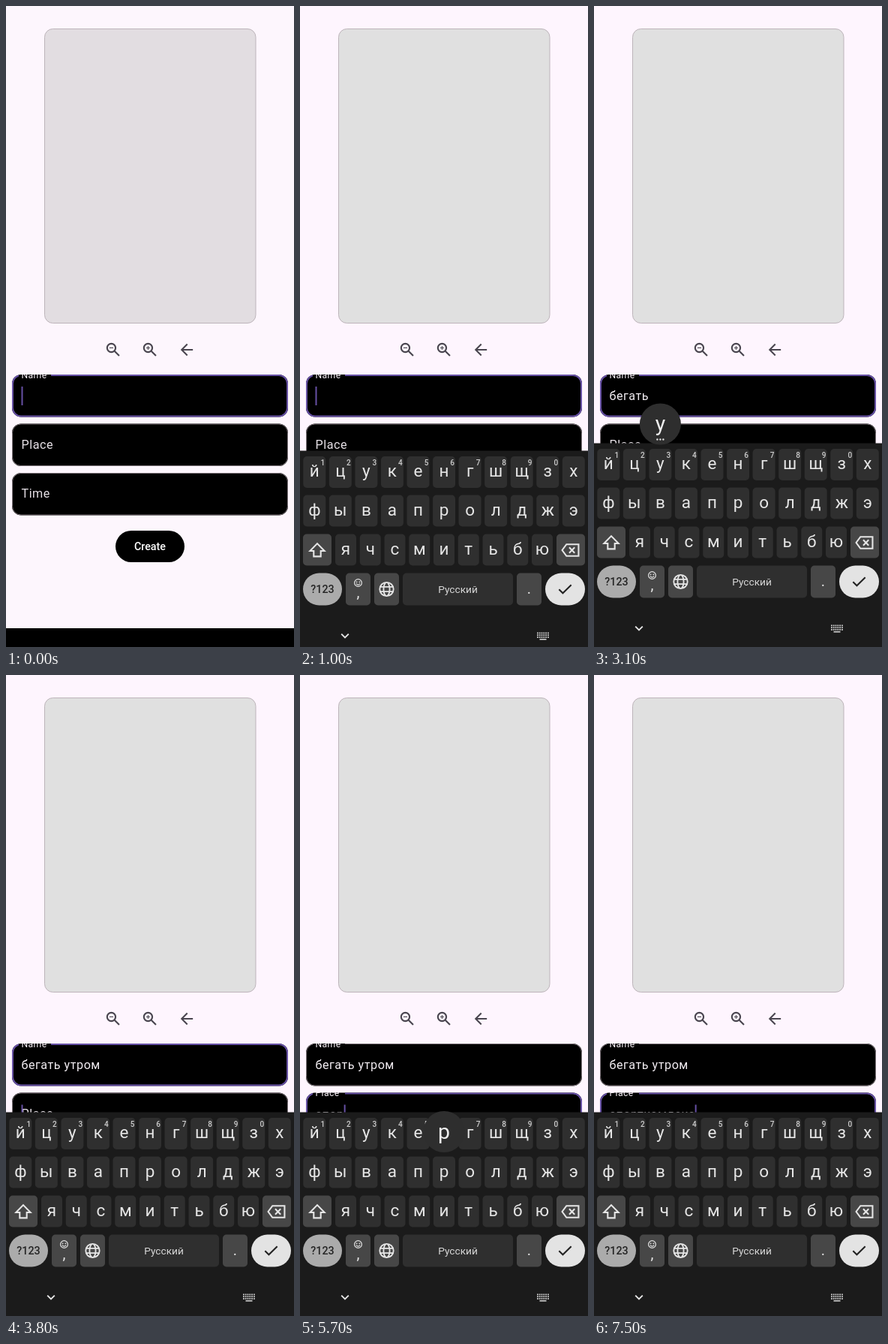
An HTML page with a canvas for the animation above (8 s loop, 384 by 854 pixels).

```html
<!DOCTYPE html>
<html lang="en">
<head>
<meta charset="utf-8">
<title>Card form</title>
<style>
html, body { margin: 0; width: 100%; height: 100%; overflow: hidden; background: #fef6fe; }
canvas { display: block; width: 384px; height: 854px; }
</style>
</head>
<body>
<canvas id="stage" width="384" height="854"></canvas>
<script>
const ctx = document.getElementById('stage').getContext('2d');
const LOOP = 8000, STEP = 100;
const PURPLE = '#6650a4', KEY = '#2f2f2f', SPECIAL = '#474747', BOARD = '#1b1b1b', GLYPH = '#e6e6e6';
const NAME = 'бегать утром', PLACE = 'спорткомлекс';

// [time, letters in Name, letters in Place, pressed key, key darkened]
const STATES = [
  [0, 0, 0],
  [1600, 0, 0, 'б'], [1700, 1, 0, 'е', 1], [1800, 2, 0, 'е'], [1900, 2, 0, 'г', 1],
  [2000, 3, 0, 'г'], [2100, 3, 0, 'а', 1], [2200, 4, 0, 'т', 1], [2300, 5, 0, 'ь', 1],
  [2400, 6, 0], [2500, 6, 0, 'space', 1], [2600, 7, 0],
  [3100, 7, 0, 'у'], [3200, 8, 0, 'т', 1], [3300, 9, 0, 'р', 1], [3400, 10, 0, 'р'],
  [3500, 10, 0, 'о', 1], [3600, 11, 0, 'м', 1], [3700, 12, 0, 'done', 1], [3800, 12, 0],
  [5200, 12, 0, 'с'], [5300, 12, 1, 'п', 1], [5400, 12, 2, 'п'], [5500, 12, 2, 'о', 1],
  [5600, 12, 3, 'р', 1], [5700, 12, 4, 'р'], [5800, 12, 4, 'т', 1], [5900, 12, 5],
  [6200, 12, 5, 'к'], [6300, 12, 6, 'к'], [6400, 12, 6, 'о', 1], [6500, 12, 7],
  [6800, 12, 7, 'м'], [6900, 12, 8, 'л', 1], [7000, 12, 9, 'л'], [7100, 12, 9, 'е', 1],
  [7200, 12, 10, 'к', 1], [7300, 12, 11, 'к'], [7400, 12, 11, 'с', 1], [7500, 12, 12]
];
const HIDDEN_CURSOR = [[100, 600], [1100, 1600], [3100, 3200], [4300, 4800]];

const ROWS = [
  { letters: 'йцукенгшщзх', x: 19.3, gap: 34.55, y: 611, w: 30 },
  { letters: 'фывапролджэ', x: 19.3, gap: 34.55, y: 662.5, w: 30 },
  { letters: 'ячсмитьбю', x: 61, gap: 32.75, y: 714.5, w: 28 }
];
const keys = ROWS.flatMap((row, r) => [...row.letters].map((char, i) => ({
  char, x: row.x + i * row.gap, y: row.y, w: row.w, row: r,
  digit: r === 0 && i < 10 ? String((i + 1) % 10) : ''
})));

function box(x, y, w, h, r, fill) {
  ctx.beginPath();
  ctx.roundRect(x, y, w, h, r);
  if (fill) { ctx.fillStyle = fill; ctx.fill(); }
}

function text(str, x, y, size, color, { align = 'left', weight = 400, spacing = 0 } = {}) {
  ctx.font = `${weight} ${size}px Roboto, sans-serif`;
  ctx.letterSpacing = spacing + 'px';
  ctx.textAlign = align;
  ctx.fillStyle = color;
  ctx.fillText(str, x, y);
  return ctx.measureText(str).width;
}

// Strokes a path given in 24-unit icon space, centred on (x, y).
function icon(path, x, y, size, color, width = 2) {
  ctx.save();
  ctx.translate(x - size / 2, y - size / 2);
  ctx.scale(size / 24, size / 24);
  ctx.strokeStyle = color;
  ctx.lineWidth = width;
  ctx.stroke(new Path2D(path));
  ctx.restore();
}

function dot(x, y, r, color) {
  ctx.fillStyle = color;
  ctx.beginPath();
  ctx.arc(x, y, r, 0, Math.PI * 2);
  ctx.fill();
}

function lens(x, plus) {
  const color = '#49454f';
  icon('M15 9.5a5.5 5.5 0 1 1-11 0a5.5 5.5 0 1 1 11 0M13.9 13.9l5.9 5.9', x, 458, 24.5, color, 2.1);
  icon('M7 9.5h5' + (plus ? 'M9.5 7v5' : ''), x, 458, 24.5, color, 1.1);
}

// float: 0 = label rests inside the field, 1 = label sits on the border
function field(y, label, { value = '', focused = false, float = 0, cursor = false } = {}) {
  box(8, y, 368, 56.5, 12, '#000');
  const inset = focused ? 1 : 0.5;
  ctx.save();
  if (float > 0) {
    ctx.beginPath();
    ctx.rect(0, y - 3, 17, 9);
    ctx.rect(17 + 43 * float, y - 3, 384, 9);
    ctx.rect(0, y + 6, 384, 60);
    ctx.clip();
  }
  box(8 + inset, y + inset, 368 - 2 * inset, 56.5 - 2 * inset, 12 - inset);
  ctx.strokeStyle = focused ? PURPLE : '#7c7379';
  ctx.lineWidth = focused ? 2 : 1;
  ctx.stroke();
  ctx.restore();
  text(label, 20.5, y + 33 - 28.5 * float, 16.2 - 4 * float,
    float ? '#fdf5fc' : '#e6e0e6', { spacing: 0.5 - 0.12 * float });
  const width = text(value, 20.5, y + 34, 16.2, '#f2edf2', { spacing: 0.5 });
  if (cursor) {
    ctx.fillStyle = PURPLE;
    ctx.fillRect(20.5 + width, y + 16, 2, 25);
  }
}

function form(t, state) {
  const [, nameCount, placeCount] = state;
  const early = t < 800;
  ctx.fillStyle = early ? '#fdf6fd' : '#fef5fe';
  ctx.fillRect(0, 0, 384, 854);

  box(51.5, 30.5, 281.5, 392, 11, early ? '#e2dde1' : '#e0e0e0');
  ctx.strokeStyle = '#bdb4ba';
  ctx.lineWidth = 1;
  ctx.stroke();

  lens(143, false);
  lens(192, true);
  icon('M20 12H5M12.7 4.7L5.4 12l7.3 7.3', 241, 458, 24.5, '#49454f');

  const visible = !HIDDEN_CURSOR.some(([from, to]) => t >= from && t < to);
  const inPlace = t >= 3800;
  const placeFocused = t >= 4300;
  field(491, 'Name', {
    value: NAME.slice(0, nameCount), focused: !placeFocused, float: 1, cursor: visible && !inPlace
  });
  field(556.5, 'Place', {
    value: PLACE.slice(0, placeCount), focused: placeFocused,
    float: t >= 4400 ? 1 : placeFocused ? 0.5 : 0, cursor: visible && inPlace
  });
  field(622, 'Time');

  box(146, 699, 92, 42, 21, '#000');
  text('Create', 192, 725, 14.3, '#fff', { align: 'center', weight: 500 });
  ctx.fillStyle = '#000';
  ctx.fillRect(0, 829, 384, 25);
}

function letterKey(key, pressed) {
  box(key.x - key.w / 2, key.y - 21, key.w, 42, 5, pressed ? '#1e1e1e' : KEY);
  text(key.char, key.x, key.y + 6, 22.5, pressed ? '#585858' : GLYPH, { align: 'center' });
  text(key.digit, key.x + 11, key.y - 9, 10, pressed ? '#585858' : '#cfcfcf', { align: 'center', weight: 500 });
}

function popup(key) {
  const y = key.y - 54;
  dot(key.x, y, 27.5, '#2e2e2e');
  text(key.char, key.x, y + 9, 28.5, '#efefef', { align: 'center' });
  if (key.row === 0) for (const dx of [-4, 0, 4]) dot(key.x + dx, y + 20.5, 1.2, '#dcdcdc');
}

function bottomRow(active) {
  const y = 745.5, h = 43;
  box(4, y, 52, h, 21.5, '#ababab');
  text('?123', 30, 772, 14.3, '#242424', { align: 'center', weight: 500 });

  box(61, y, 33, h, 5, SPECIAL);
  icon('M21 12a9 9 0 1 1-18 0a9 9 0 1 1 18 0M7.5 14a5 5 0 0 0 9 0', 77.5, 758.5, 13, GLYPH, 2.2);
  dot(75.6, 757.3, 0.9, GLYPH);
  dot(79.4, 757.3, 0.9, GLYPH);
  text(',', 77.5, 778, 20, GLYPH, { align: 'center' });

  box(99, y, 33, h, 5, SPECIAL);
  icon('M21 12a9 9 0 1 1-18 0a9 9 0 1 1 18 0M16 12a4 9 0 1 1-8 0a4 9 0 1 1 8 0M4 9h16M4 15h16',
    115.5, 767, 24.5, GLYPH, 1.8);

  box(137, y, 147, h, 5, active === 'space' ? SPECIAL : KEY);
  text('Русский', 210.5, 771.5, 13.7, '#d8d8d8', { align: 'center' });

  box(289, y, 33, h, 5, SPECIAL);
  text('.', 305.5, 773, 20, GLYPH, { align: 'center' });

  box(327, y, 53, h, 21.5, active === 'done' ? '#bdbdbd' : '#e3e3e3');
  icon('M4 12.2l5 5L20 6.3', 353.5, 767, 24.5, '#222');
}

function keyboard(t, [, , , active, dark]) {
  if (t < 800) return;
  // The board slides up, closing most of the remaining gap at every step.
  const n = (t - 800) / STEP;
  const offset = n >= 4 ? 0 : Math.round(180 * 0.236 ** n);
  ctx.save();
  ctx.translate(0, offset);
  ctx.fillStyle = BOARD;
  ctx.fillRect(0, 582.5, 384, 272);

  for (const key of keys) letterKey(key, dark && key.char === active);
  box(4, 693.5, 38, 42, 5, SPECIAL);
  icon('M12 3.5L2.8 13H7.5v7h9v-7h4.7z', 23, 715, 25, GLYPH);
  box(342, 693.5, 38, 42, 5, SPECIAL);
  icon('M7 4.5h15.5v15H7L1.5 12zM10.5 8.5l7 7M17.5 8.5l-7 7', 360.5, 715, 25, GLYPH);
  bottomRow(active);

  icon('M6.5 9.3l5.5 5.5l5.5-5.5', 60, 829, 21, GLYPH, 2.2);
  for (let r = 0; r < 3; r++) {
    for (let c = 0; c < 6; c++) {
      ctx.fillStyle = '#d0d0d0';
      ctx.fillRect(316 + c * 2.8, 824.5 + r * 2.8, 1.8, 1.8);
    }
  }
  ctx.fillRect(319.5, 833, 9, 1.6);

  const pressedKey = keys.find(key => key.char === active);
  if (pressedKey) popup(pressedKey);
  ctx.restore();
}

function draw(now) {
  const t = Math.floor((now % LOOP) / STEP) * STEP;
  const state = STATES.findLast(([from]) => from <= t);
  form(t, state);
  keyboard(t, state);
}

const start = performance.now();
function tick() {
  draw(performance.now() - start);
  requestAnimationFrame(tick);
}
tick();
</script>
</body>
</html>
```
